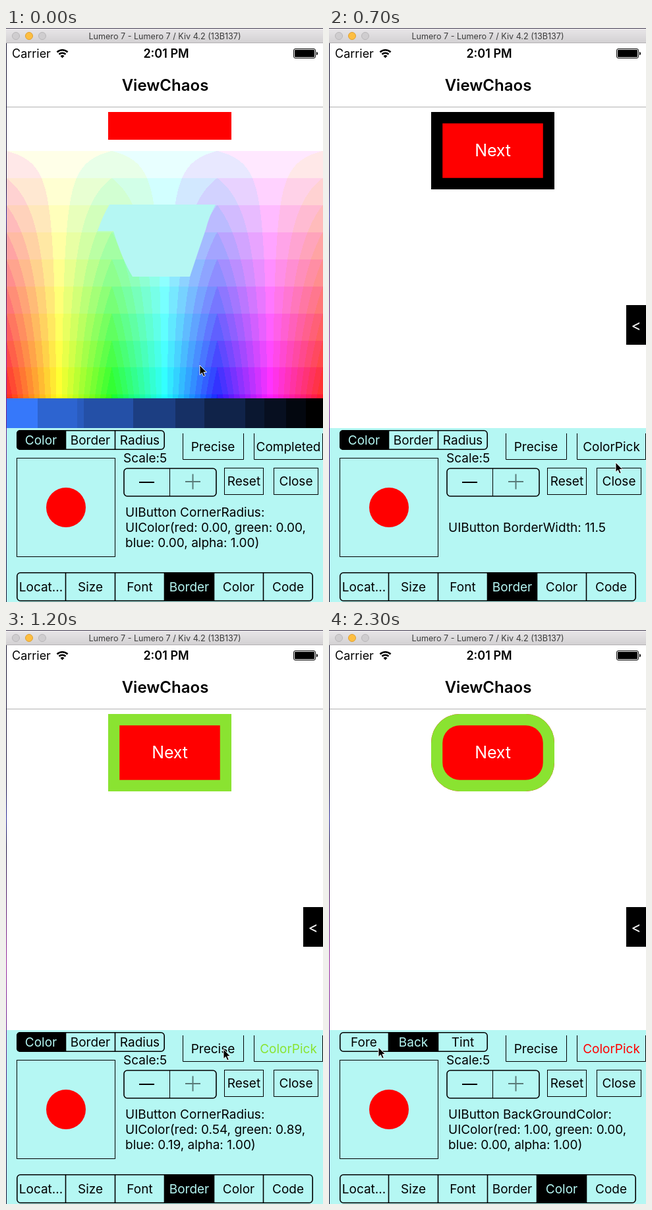
Write an HTML page with a canvas that moves like this. It is 481 px wide and 868 px high and loops after 2400 ms.

```html
<!DOCTYPE html>
<html lang="en">
<head>
<meta charset="utf-8">
<title>ViewChaos</title>
<style>
html, body { margin: 0; width: 481px; height: 868px; overflow: hidden; background: #fff; }
body { position: relative; font-family: Inter, "Liberation Sans", sans-serif; }
svg, canvas, #next, #tab { position: absolute; left: 0; top: 0; }
svg text { font-size: 19px; white-space: pre; }
#next {
  left: 155px; top: 127px; width: 187px; height: 117px; box-sizing: border-box;
  border: 0 solid #000; background: red;
}
#next span {
  position: absolute; left: 0; top: 0; width: 187px; line-height: 117px;
  text-align: center; color: #fff; font-size: 25px; letter-spacing: -.2px;
}
#tab {
  left: 451px; top: 419px; width: 30px; height: 60px; line-height: 62px;
  background: #000; color: #fff; font-size: 23px; text-align: center;
}
#picker { top: 169px; }
.mid { text-anchor: middle; }
.line { fill: none; stroke: #000; }
.bold { stroke-width: 1.6; }
</style>
</head>
<body>
<div id="next"><span>Next</span></div>
<div id="tab">&lt;</div>
<canvas id="picker" width="481" height="436"></canvas>
<svg width="481" height="868" viewBox="0 0 481 868">
  <defs>
    <linearGradient id="chrome" x2="0" y2="1">
      <stop stop-color="#e9e7e9"/><stop offset="1" stop-color="#d2d0d2"/>
    </linearGradient>
    <linearGradient id="desk" x2="0" y2="1">
      <stop stop-color="#14102e"/><stop offset=".25" stop-color="#1b1440"/>
      <stop offset=".31" stop-color="#3030a0"/><stop offset=".36" stop-color="#1b1440"/>
      <stop offset=".57" stop-color="#9a2aa0"/><stop offset=".8" stop-color="#3c1c80"/>
      <stop offset="1" stop-color="#14102e"/>
    </linearGradient>
  </defs>

  <rect width="481" height="23" fill="url(#chrome)"/>
  <rect width="481" height="1" fill="#4a4358"/>
  <rect y="22" width="481" height="1" fill="#b4b2b4"/>
  <g stroke-width="1">
    <circle cx="15" cy="12" r="5.5" fill="#cfcdcf" stroke="#b9b7b9"/>
    <circle cx="35" cy="12" r="5.5" fill="#fdbe41" stroke="#dfa033"/>
    <circle cx="55" cy="12" r="5.5" fill="#cfcdcf" stroke="#b9b7b9"/>
  </g>
  <text class="mid" x="241" y="17" style="font-size:12.6px" fill="#3c3c3c">Lumero 7 - Lumero 7 / Kiv 4.2 (13B137)</text>

  <text x="9" y="45" style="font-size:18px">Carrier</text>
  <g class="line" stroke-width="2.6">
    <path d="M77.5 36.5a11.5 11.5 0 0 1 16 0M80.5 39.8a7.2 7.2 0 0 1 10 0"/>
    <path d="M85.5 45.5l-3 -3.2a4.4 4.4 0 0 1 6 0z" fill="#000" stroke="none"/>
  </g>
  <text class="mid" x="243" y="45" style="font-size:18px;font-weight:600">2:01 PM</text>
  <rect class="line" x="436.5" y="31.5" width="33" height="14" rx="2.5"/>
  <rect x="438" y="33" width="30" height="11" rx="1"/>
  <path d="M471 36q2 0 2 2.5t-2 2.5z"/>
  <text class="mid" x="241.5" y="95" style="font-size:24px;font-weight:600">ViewChaos</text>
  <rect y="119" width="481" height="1" fill="#b2b2b2"/>

  <rect y="605" width="481" height="263" fill="#b5f7f3"/>
  <g id="modes"></g>
  <path class="line" d="M268.5 613v39.5h92V613"/>
  <text class="mid" x="314" y="640">Precise</text>
  <g id="pick">
    <path class="line" d="M376.5 613v39.5h104V613"/>
    <text class="mid" x="428.5" y="640"></text>
  </g>
  <text x="178" y="657">Scale:5</text>
  <rect class="line bold" x="179" y="666" width="140" height="42" rx="5"/>
  <path class="line" d="M248.5 666v42"/>
  <path class="line" stroke-width="2" d="M202 687h23"/>
  <path class="line" stroke-width="2" d="M272 686h23M283.5 674.5v23" opacity=".5"/>
  <rect class="line" x="331.5" y="665.5" width="59" height="40"/>
  <text class="mid" x="361" y="692">Reset</text>
  <rect class="line" x="406.5" y="665.5" width="67" height="40"/>
  <text class="mid" x="440" y="692">Close</text>
  <rect class="line" x="16.5" y="650.5" width="149" height="149"/>
  <circle id="knob" r="30" fill="red"/>
  <g id="info"></g>
  <g id="tabs"></g>

  <rect y="23" width="1" height="845" fill="url(#desk)"/>
  <path id="cursor" d="M0 0V14.5L3.4 11.4 5.7 16.8 8.2 15.7 5.9 10.5H10.4Z" stroke="#fff" stroke-width=".9"/>
</svg>
<script>
const $ = id => document.getElementById(id);
const STEP = 100, STEPS = 24, PANEL = '#b5f7f3';
const ctx = $('picker').getContext('2d');

// Hue runs across and saturation down, each channel cut into even levels.
function drawSpectrum() {
  const w = 481, h = 391, cut = .089, img = ctx.createImageData(w, h);
  for (let y = 0, i = 0; y < h; y++) {
    const sat = Math.max(0, y + 4) / 460;
    for (let x = 0; x < w; x++) {
      for (const n of [5, 3, 1]) {
        const k = (n + x / 80) % 6;
        const loss = sat * Math.max(0, Math.min(k, 4 - k, 1));
        img.data[i++] = 255 * (1 - Math.round(loss / cut) * cut);
      }
      img.data[i++] = 255;
    }
  }
  ctx.putImageData(img, 0, 0);
  ctx.translate(0, -169);
  ctx.fillStyle = PANEL;
  ctx.fill(new Path2D('M157 267H318Q308 285 303 305L291 340 279 376H192Q176 350 163 307H139Q146 285 157 267Z'));
}

const bars = {
  blue: { rgb: [54, 120, 250], edges: [0, 48, 108, 118, 193, 257, 301, 363, 392, 425, 455, 481] },
  lime: { rgb: [157, 255, 54], edges: [0, 30, 78, 138, 235, 333, 348, 422, 468, 481] }
};

function drawBar({ rgb, edges }) {
  edges.slice(1).forEach((end, i) => {
    const start = edges[i];
    const v = start === 0 ? 1 : Math.max(0, 1 - (start + end) / 2 / 468);
    ctx.fillStyle = `rgb(${rgb.map(c => Math.round(c * v))})`;
    ctx.fillRect(start, 560, end - start, 45);
  });
}

function segments(names, on, y, height) {
  const w = 75, x0 = 16, full = w * names.length;
  const cells = names.map((name, i) => {
    const x = x0 + i * w, active = i === on;
    const r = active && (i === 0 || i === names.length - 1) ? 5 : 0;
    return (active ? `<rect x="${x}" y="${y}" width="${w}" height="${height}" rx="${r}"/>` : '') +
      (i ? `<path class="line bold" d="M${x - .5} ${y}v${height}"/>` : '') +
      `<text class="mid" x="${x + 37}" y="${y + height / 2 + 7}" fill="${active ? PANEL : '#000'}">${name}</text>`;
  });
  return cells.join('') +
    `<rect class="line bold" x="${x0 + .8}" y="${y + .8}" width="${full - 1.6}" height="${height - 1.6}" rx="5"/>`;
}

const colorInfo = (what, r, g, b) =>
  [`UIButton ${what}:`, `UIColor(red: ${r}, green: ${g},`, `blue: ${b}, alpha: 1.00)`];
const widthInfo = v => [`UIButton BorderWidth: ${v.toFixed(1)}`];
const radiusInfo = v => [`UIButton CornerRadius: ${v.toFixed(1)}`];

const border = ['Color', 'Border', 'Radius'], color = ['Fore', 'Back', 'Tint'];
const home = [91, 725], lime = '#8ae331';
const setWidth = (width, more) => ({ width, info: widthInfo(width), ...more });
const setRadius = (radius, more) => ({ radius, info: radiusInfo(radius), ...more });

// Each entry changes the state from its step onward.
const script = {
  0: {
    cursor: [294, 510], open: true, bar: 'blue', modes: border, mode: 0, tab: 3, knob: home,
    width: 0, radius: 0, edge: '#000', ink: '#000', pick: true,
    info: colorInfo('CornerRadius', '0.00', '0.00', '0.00')
  },
  1: { cursor: [427, 634] },
  2: { cursor: [300, 630], open: false },
  3: { cursor: [140, 620] },
  4: setWidth(0, { cursor: [92, 722], mode: 1, pick: false }),
  5: setWidth(7, { cursor: [106, 706], knob: [105, 709] }),
  6: setWidth(11.5, { cursor: [62, 628], knob: home, mode: 0, pick: true }),
  7: { cursor: [435, 657] },
  8: { cursor: [420, 640], open: true },
  9: { cursor: [125, 524], bar: 'lime', edge: '#9dff36', ink: '#9dff36', info: colorInfo('CornerRadius', '0.61', '1.00', '0.21') },
  10: { cursor: [121, 514], edge: lime, ink: lime, info: colorInfo('CornerRadius', '0.54', '0.89', '0.19') },
  11: { cursor: [424, 636] },
  12: { cursor: [330, 634], open: false },
  13: setRadius(0, { cursor: [200, 626], mode: 2, pick: false }),
  14: setRadius(20, { cursor: [94, 700], knob: [101, 709] }),
  15: setRadius(33, { cursor: [87, 707], knob: [94, 717] }),
  16: setRadius(31, { cursor: [86, 711], knob: [93, 721] }),
  17: setRadius(29, { cursor: [85, 715], knob: [92, 725] }),
  18: { cursor: [190, 690], knob: home },
  19: { cursor: [329, 654] },
  20: { cursor: [348, 780] },
  21: {
    cursor: [352, 842], tab: 4, modes: color, mode: 1, pick: true, ink: 'red',
    info: colorInfo('BackGroundColor', '1.00', '0.00', '0.00')
  },
  22: { cursor: [130, 636] },
  23: { cursor: [75, 631] }
};

const states = [];
for (let i = 0; i < STEPS; i++) states.push({ ...states[i - 1], ...script[i] });

function render(s) {
  const next = $('next').style;
  next.boxShadow = s.width ? `inset 0 0 0 ${s.width * 1.5}px ${s.edge}` : 'none';
  next.borderRadius = s.radius * 1.5 + 'px';
  $('picker').style.display = s.open ? 'block' : 'none';
  drawBar(bars[s.bar]);
  $('modes').innerHTML = segments(s.modes, s.mode, 608, 30);
  $('tabs').innerHTML = segments(['Locat...', 'Size', 'Font', 'Border', 'Color', 'Code'], s.tab, 823, 44);
  $('pick').style.display = s.pick ? 'inline' : 'none';
  const label = $('pick').lastElementChild;
  label.textContent = s.open ? 'Completed' : 'ColorPick';
  label.setAttribute('fill', s.ink);
  $('knob').setAttribute('transform', `translate(${s.knob})`);
  const top = s.info.length > 1 ? 739 : 762;
  $('info').innerHTML = s.info.map((t, i) => `<text x="181" y="${top + i * 23}">${t}</text>`).join('');
  $('cursor').setAttribute('transform', `translate(${s.cursor})`);
}

let shown = -1;
const begin = performance.now();
function tick() {
  const step = Math.floor((performance.now() - begin) / STEP) % STEPS;
  if (step !== shown) render(states[shown = step]);
  requestAnimationFrame(tick);
}
drawSpectrum();
tick();
</script>
</body>
</html>
```
